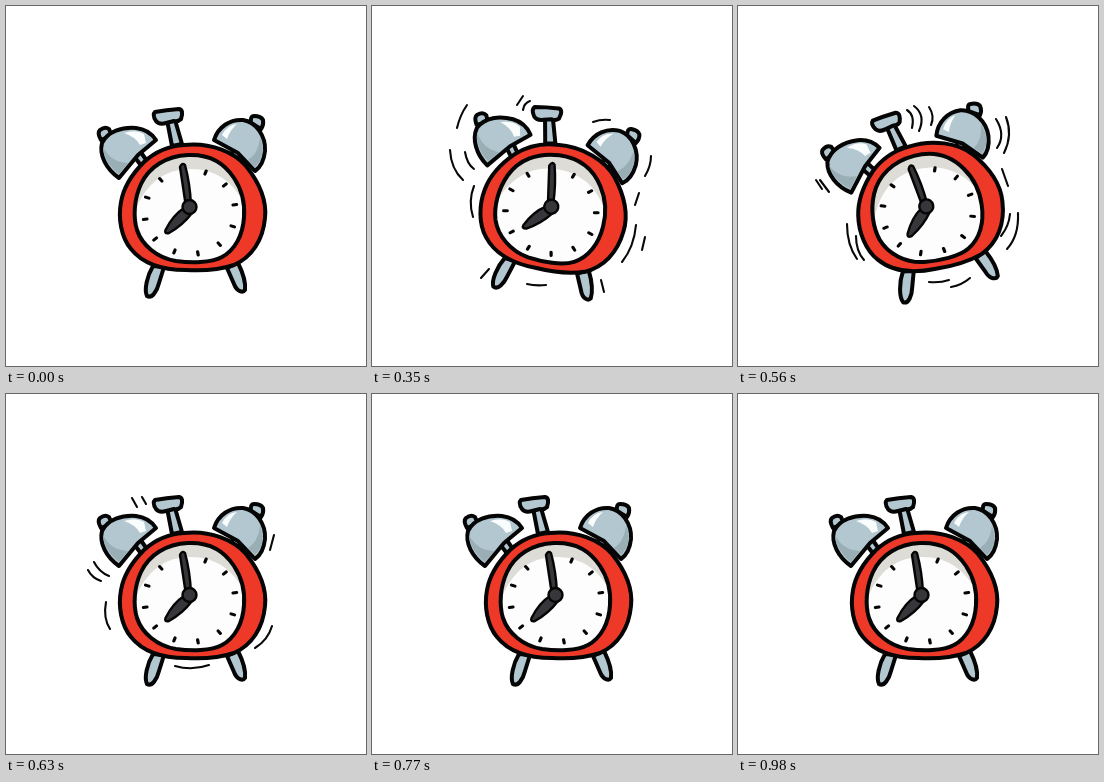
Write an HTML page that moves like this. It is 360 by 360 pixels and loops after 1.05 s.

```html
<!DOCTYPE html>
<html lang="en">
<head>
<meta charset="utf-8">
<title>Ringing alarm clock</title>
<style>
html, body { margin: 0; width: 100%; height: 100%; overflow: hidden; background: #fff; }
svg { display: block; width: 100%; height: 100%; }
.ink { stroke: #050505; stroke-width: 4; stroke-linejoin: round; stroke-linecap: round; }
.steel { fill: #b2c7cf; }
.shade { fill: #9aaeb6; }
.shine { fill: #fafdfd; }
.hand { fill: #37373b; stroke-width: 2.4; }
#ticks path { stroke-width: 3.1; }
#shake path { fill: none; stroke: #080808; stroke-width: 2.1; stroke-linecap: round; }
</style>
</head>
<body>
<svg viewBox="0 0 360 360">
  <defs>
    <path id="dialShape" d="M182 149C204 148 219 158 228 172C236 184 239 198 238 211C237 229 229 244 216 251C205 257 185 257 170 255C151 252 136 239 131 224C127 211 128 193 135 178C143 161 160 150 182 149Z"/>
    <clipPath id="dialClip"><use href="#dialShape"/></clipPath>
  </defs>
  <g id="clock">
    <!-- legs -->
    <path class="ink steel" d="M147 260C141 270 138 284 141 290C146 293 151 285 153 277L158 261Z"/>
    <path class="ink steel" d="M221 262L228 278C231 286 237 287 239 284C240 276 236 265 232 257Z"/>
    <!-- rods and handle -->
    <path class="ink steel" d="M127 149L137 162L143 158L134 145Z"/>
    <path class="ink steel" d="M229 143L222 152L228 157L236 147Z"/>
    <path class="ink steel" d="M161 114L166 140L176 138L169 114Z"/>
    <path class="ink steel" d="M149 106Q160 104 173 103Q178 104 175 113Q172 116 168 115L160 117Q153 119 150 115Q146 109 149 106Z"/>
    <!-- bells -->
    <path class="ink steel" d="M95 134Q91 127 94 124Q99 120 103 123L106 130Z"/>
    <path class="ink steel" d="M113 172C100 163 93 149 96 137C102 125 116 121 130 122C139 123 146 128 150 134L132 149Z"/>
    <path class="shade" d="M113 168C103 160 97 150 97 141C103 152 110 156 122 157Z"/>
    <path class="shine" d="M118 127Q130 123 138 128L140 137L134 139Q130 131 118 127Z"/>
    <path class="ink steel" d="M245 117Q244 110 248 110Q255 110 257 114Q258 119 255 123Z"/>
    <path class="ink steel" d="M208 134C212 121 224 113 237 114C250 116 260 130 259 145C258 154 255 161 249 165L232 147Z"/>
    <path class="shade" d="M249 161L242 154Q252 148 254 132Q261 149 249 161Z"/>
    <path class="shine" d="M216 129Q221 119 231 118Q224 124 221 133Z"/>
    <!-- case and dial -->
    <path class="ink" fill="#ee3929" d="M178 139C204 136 228 146 240 160C252 175 261 194 259 212C257 234 246 251 228 259C213 264 196 265 180 264C157 264 137 258 125 243C115 231 112 212 115 196C118 179 127 167 138 156C150 145 163 140 178 139Z"/>
    <use href="#dialShape" fill="#dedcd7"/>
    <path d="M126 212C138 178 158 163 184 163C212 163 230 178 242 205V270H120Z" fill="#fdfdfd" clip-path="url(#dialClip)"/>
    <use href="#dialShape" class="ink" fill="none"/>
    <g id="ticks" class="ink" transform="translate(184 206) scale(1.04 .96)"></g>
    <!-- hands -->
    <path class="ink hand" d="M180 201L174 161Q176 156 179 159Q184 177 185 199Z"/>
    <path class="ink hand" d="M178 202Q167 209 159.500 224Q158 228 163 227Q177 219 186 207Z"/>
    <circle class="ink hand" cx="183.500" cy="201" r="7"/>
  </g>
  <g id="shake"></g>
</svg>
<script>
const STEP = 70, LOOP = 1050;
const byId = id => document.getElementById(id);

byId("ticks").innerHTML = Array.from({ length: 11 }, (_, i) =>
  `<path d="M0 -42V-45.500" transform="rotate(${30 * i + 20})"/>`).join("");

// Motion strokes around the clock
const wide = "M62 112Q49 140 52 170M76 147Q76 168 84 182M111 94Q119 92 130 92M102 108Q113 106 125 107" +
  "M179 97Q187 101 187 111M190 97Q197 101 195 109M204 106L205 108M217 109L231 103" +
  "M265 138L262 149M271 138L267 150M277 139L275 150M257 226L250 249M265 222L256 242M269 237L262 252" +
  "M104 239L115 251M169 279Q180 281 190 275";
const right = "M95 99Q88 109 85 122M78 144Q79 163 91 174M93 146Q95 158 102 163M102 180Q96 195 101 211" +
  "M145 99L151 90M151 104Q152 97 158 95M221 116Q229 113 238 114M279 150Q279 160 273 170" +
  "M267 187L263 199M264 219Q262 241 250 256M273 231L270 244" +
  "M117 263L109 272M155 278Q163 280 174 279M229 274L232 286";
const left = "M78 174L84 183M82 174L91 186M118 230Q118 245 126 254M109 218Q109 239 119 253" +
  "M169 104Q177 109 174 122M176 100Q188 109 181 125M191 101Q197 110 193 119" +
  "M258 113Q268 129 259 142M268 111Q275 129 266 147M264 163L270 180" +
  "M280 207Q281 230 269 243M272 208Q271 220 263 230M191 276Q202 277 211 274M213 281Q224 279 232 272";
const close = "M82 176Q86 184 95 187M88 168Q93 178 103 182" +
  "M100 208Q97 224 104 235M126 104L131 113M136 103L140 110" +
  "M268 141L264 156M266 232Q262 246 249 254M169 272Q186 277 203 271";

// step index: [tilt in degrees, strokes]; every other step rests upright
const poses = {
  3: [0, wide], 4: [0, close], 5: [10.5, right],
  8: [-12, left], 9: [0, close], 10: [10.5, right], 13: [-12, ""]
};

function draw(now) {
  const [tilt, strokes] = poses[Math.floor(now % LOOP / STEP)] || [0, ""];
  byId("clock").setAttribute("transform", `rotate(${tilt} 183 178)`);
  byId("shake").innerHTML = `<path d="${strokes}"/>`;
}

const start = performance.now();
function frame() {
  draw(performance.now() - start);
  requestAnimationFrame(frame);
}
frame();
</script>
</body>
</html>
```
